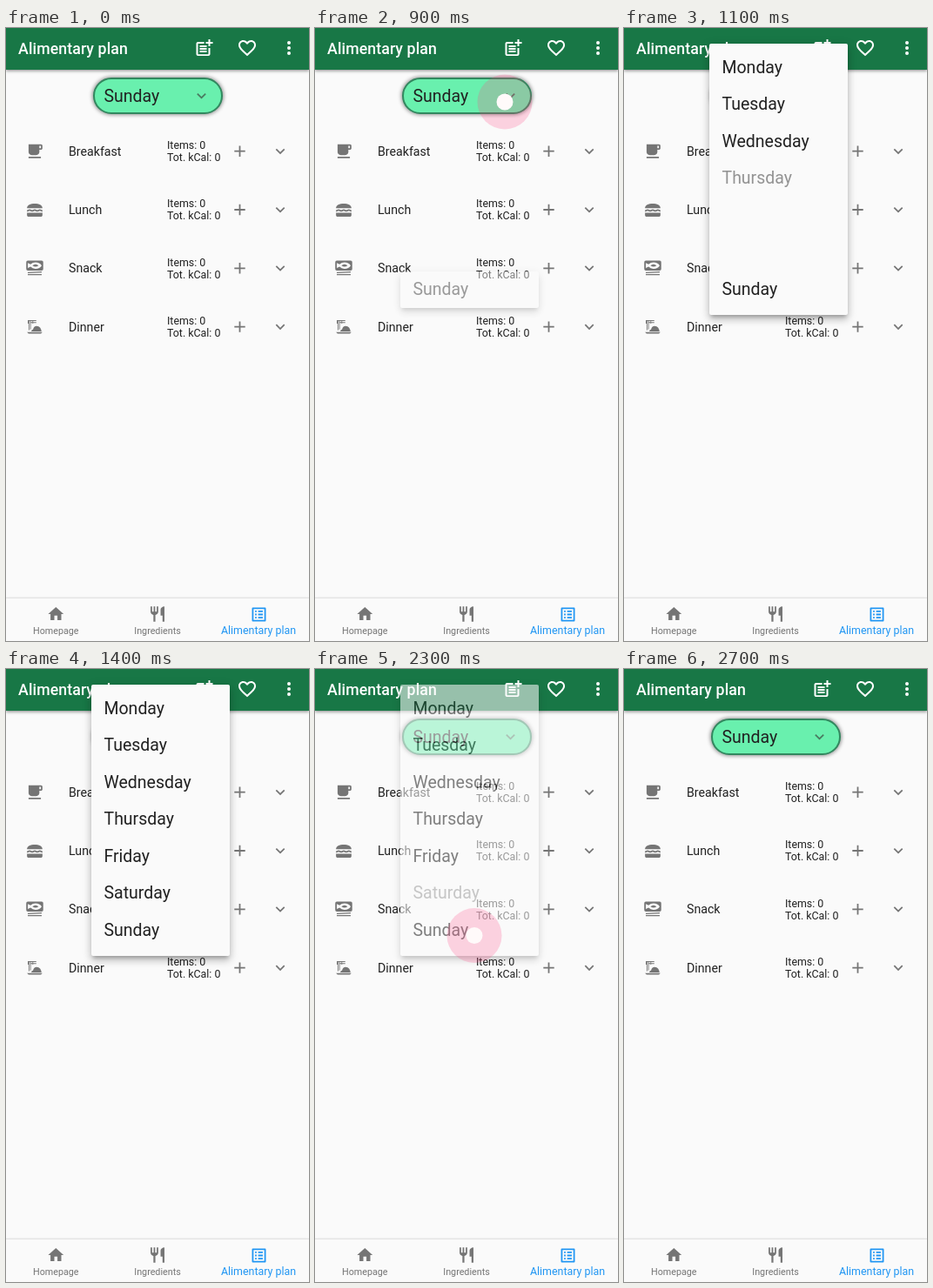
Recreate the animation shown at these times as an HTML page. Size 348 by 705 pixels, loop 3000 ms.

```html
<!DOCTYPE html>
<html lang="en">
<head>
<meta charset="utf-8">
<title>Alimentary plan</title>
<style>
  html, body { margin: 0; width: 100%; height: 100%; overflow: hidden; background: #fafafa; }
  body { position: relative; font-family: Roboto, sans-serif; color: #212121; }
  svg { position: absolute; left: 0; top: 0; display: block; }
  text { fill: #212121; font-size: 14.18px; }
  .title { fill: #fff; font-size: 17.72px; font-weight: 500; letter-spacing: .1px; }
  .note { font-size: 12.4px; }
  .day { font-size: 19.49px; }
  .tab { font-size: 10.75px; fill: #757575; text-anchor: middle; }
  .tab.on { font-size: 12.4px; fill: #2196f3; }
  .bar, .pill, #menu { position: absolute; box-sizing: border-box; }
  .bar { left: 0; width: 348px; }
  .top { top: 0; height: 47.5px; background: #187746;
    box-shadow: 0 1px 3px rgba(0,0,0,.3), 0 2px 4px rgba(0,0,0,.16); }
  .bottom { top: 656px; height: 49px; background: #fafafa;
    box-shadow: 0 -1px 1px rgba(0,0,0,.07), 0 0 4px rgba(0,0,0,.07); }
  .pill { left: 99.5px; top: 57px; width: 149px; height: 41.5px; border-radius: 21px;
    border: 2px solid #32885f; background: #69f0ae; box-shadow: 0 0 4px 1px rgba(0,0,0,.42); }
  #menu { left: 98px; width: 159px; overflow: hidden; border-radius: 2px; background: #fafafa;
    box-shadow: 0 4px 4px -2px rgba(0,0,0,.22), 0 6px 9px rgba(0,0,0,.15), 0 2px 11px 1px rgba(0,0,0,.13); }
  #menu div { position: absolute; left: 14.5px; font-size: 19.49px; line-height: 42.5px; }
</style>
</head>
<body>
<div class="bar top"></div>
<div class="bar bottom"></div>
<div class="pill"></div>
<svg id="page" width="348" height="705"></svg>
<div id="menu"></div>
<svg width="348" height="705">
  <g id="touch">
    <circle r="31.5" fill="#ff4081" opacity=".22"/>
    <circle r="9.5" fill="#fffafa"/>
  </g>
</svg>
<script>
const LOOP = 3000, STEP = 100;
const OPEN = 867, CLOSE = 2267, SPAN = 300;
const MENU_TOP = 18, MENU_END = 330, ITEM = 42.5, FIRST = 24.75;
const TAPS = [
  { from: 800, to: 1100, x: 218, y: 85 },
  { from: 2200, to: 2500, x: 183, y: 306.5 }
];
const DAYS = ['Monday', 'Tuesday', 'Wednesday', 'Thursday', 'Friday', 'Saturday', 'Sunday'];
const MEALS = ['Breakfast', 'Lunch', 'Snack', 'Dinner'];

// Icons on a 24 unit grid
const ICONS = {
  Breakfast: 'M20 3H4v10c0 2.2 1.8 4 4 4h6c2.2 0 4-1.8 4-4v-3h2c1.1 0 2-.9 2-2V5c0-1.1-.9-2-2-2zm0 5h-2V5h2zM4 19h16v2H4z',
  Lunch: 'M2 16h20v3c0 1.1-.9 2-2 2H4c-1.1 0-2-.9-2-2zM18.7 11.5c-2 0-2.1 1-3.4 1-1.2 0-1.4-1-3.3-1-2 0-2.1 1-3.3 1-1.2 0-1.4-1-3.4-1-1.9 0-2 1-3.3 1v2c1.9 0 2.2-1 3.3-1 1.2 0 1.5 1 3.4 1s2.1-1 3.3-1 1.4 1 3.3 1c2 0 2.1-1 3.4-1 1.2 0 1.4 1 3.3 1v-2c-1.3 0-1.5-1-3.3-1zM22 10c0-4-4.3-6-10-6S2 6 2 10z',
  Snack: 'M3 2h18q2 0 2 2v9q0 2-2 2H3q-2 0-2-2V4q0-2 2-2zM3 5.2v6.6l3.6-1.7q2.6 2.6 6.4 2.6 5.4 0 8-4.2-2.6-4.2-8-4.2-3.8 0-6.4 2.6zM9 8.5q4-3.4 8 0-4 3.2-8 0zM3 17l18-.9v1.5L3 18.5zM3 19.5h18V21H3z',
  Dinner: 'M2 19h20l-2 2H4zM3 3.5h11v1H10v1.6h4v1h-4V8H9V4.5H7V6h2v1H7v8.2l-1 .4V4.5H5v11.6l-1 .6V8H3zM7.5 18q.2-2.2 2.4-2.8.8-4 4.6-4.2 5.6.6 6.3 7z',
  add: 'M19 13h-6v6h-2v-6H5v-2h6V5h2v6h6z',
  more: 'M16.6 8.6 12 13.2 7.4 8.6 6 10l6 6 6-6z',
  post: 'M17 19.2H5V7h7V5H5c-1.1 0-2 .9-2 2v12c0 1.1.9 2 2 2h12c1.1 0 2-.9 2-2v-7h-2zM19 2h-2v3h-3v2h3v3h2V7h3V5h-3zM7 9h8v2H7zM7 12h8v2H7zM7 15h8v2H7z',
  heart: 'M16.5 3c-1.74 0-3.41.81-4.5 2.09C10.91 3.81 9.24 3 7.5 3 4.42 3 2 5.42 2 8.5c0 3.78 3.4 6.86 8.55 11.54L12 21.35l1.45-1.32C18.6 15.36 22 12.28 22 8.5 22 5.42 19.58 3 16.5 3zM12 18.6C7.2 14.2 4 11.4 4 8.5 4 6.5 5.5 5 7.5 5c1.5 0 3 1 3.6 2.4h1.8C13.5 6 15 5 16.5 5c2 0 3.5 1.5 3.5 3.5 0 2.9-3.2 5.7-8 10.1z',
  dots: [6, 12, 18].map(y => `M10 ${y}a2 2 0 1 0 4 0a2 2 0 1 0-4 0z`).join(''),
  home: 'M10 20v-6h4v6h5v-8h3L12 3 2 12h3v8z',
  fork: 'M11 9H9V2H7v7H5V2H3v7c0 2.1 1.7 3.8 3.75 4v9h2.5v-9C11.3 12.8 13 11.1 13 9V2h-2zM16 6v8h2.5v8H21V2c-2.8 0-5 2.2-5 4z',
  list: 'M4 3h16q1 0 1 1v16q0 1-1 1H4q-1 0-1-1V4q0-1 1-1zM5 5v14h14V5z' +
    [7, 11, 15].map(y => `M11 ${y}h6v2h-6zM7 ${y}h2v2H7z`).join('')
};

const icon = (name, x, y, fill = '#757575', k = .886) =>
  `<path d="${ICONS[name]}" fill="${fill}" fill-rule="evenodd" transform="translate(${x} ${y}) scale(${k}) translate(-12 -12)"/>`;
const label = (s, x, y, cls = '') => `<text x="${x}" y="${y}" class="${cls}">${s}</text>`;

const mealRow = (name, i) => {
  const y = 141.7 + i * 67.3;
  return icon(name, 33, y) + label(name, 72, y + 5) +
    label('Items: 0', 185, y - 2.7, 'note') + label('Tot. kCal: 0', 185, y + 11.3, 'note') +
    icon('add', 268.5, y) + icon('more', 315, y);
};

document.getElementById('page').innerHTML =
  label('Alimentary plan', 14, 30, 'title') +
  icon('post', 227.5, 23, '#fff', 1) + icon('heart', 277, 23, '#fff', 1) + icon('dots', 325, 23, '#fff', 1) +
  label('Sunday', 112.5, 84.5, 'day') + icon('more', 224.5, 78, '#4a7a60') +
  MEALS.map(mealRow).join('') +
  icon('home', 57.3, 674) + icon('fork', 174, 674) + icon('list', 290.5, 674.5, '#2196f3') +
  label('Homepage', 57.3, 697, 'tab') + label('Ingredients', 174, 697, 'tab') +
  label('Alimentary plan', 290, 697, 'tab on');

const menu = document.getElementById('menu');
const touch = document.getElementById('touch');
const items = DAYS.map(day => {
  const el = document.createElement('div');
  el.textContent = day;
  return menu.appendChild(el);
});

const clamp = v => Math.min(1, Math.max(0, v));
const part = (v, a, b) => clamp((v - a) / (b - a));
const mix = (a, b, v) => a + (b - a) * v;

function drawMenu(t) {
  const closing = t >= CLOSE;
  const p = closing ? 1 - part(t, CLOSE, CLOSE + SPAN) : part(t, OPEN, OPEN + SPAN);
  const fade = closing ? part(p, .75, 1) : part(p, 0, .25);
  const grow = closing ? 1 : part(p, .25, .5);
  const last = DAYS.length - 1;
  const start = FIRST + last * ITEM;
  const top = mix(start, MENU_TOP, grow);
  const unit = .5 / (DAYS.length + 1.5);

  menu.style.opacity = fade;
  menu.style.top = top + 'px';
  menu.style.height = mix(start + ITEM, MENU_END, grow) - top + 'px';
  items.forEach((el, i) => {
    const from = .5 + (i + 1) * unit;
    el.style.top = FIRST + i * ITEM - top + 'px';
    el.style.opacity = i === last ? 1 : part(p, from, Math.min(1, from + 1.5 * unit));
  });
}

function draw(now) {
  const t = Math.floor(now % LOOP / STEP) * STEP;
  const tap = TAPS.find(k => t >= k.from && t < k.to);
  drawMenu(t);
  touch.style.display = tap ? '' : 'none';
  if (tap) touch.setAttribute('transform', `translate(${tap.x} ${tap.y})`);
}

const begin = performance.now();
function tick() {
  draw(performance.now() - begin);
  requestAnimationFrame(tick);
}
tick();
</script>
</body>
</html>
```
